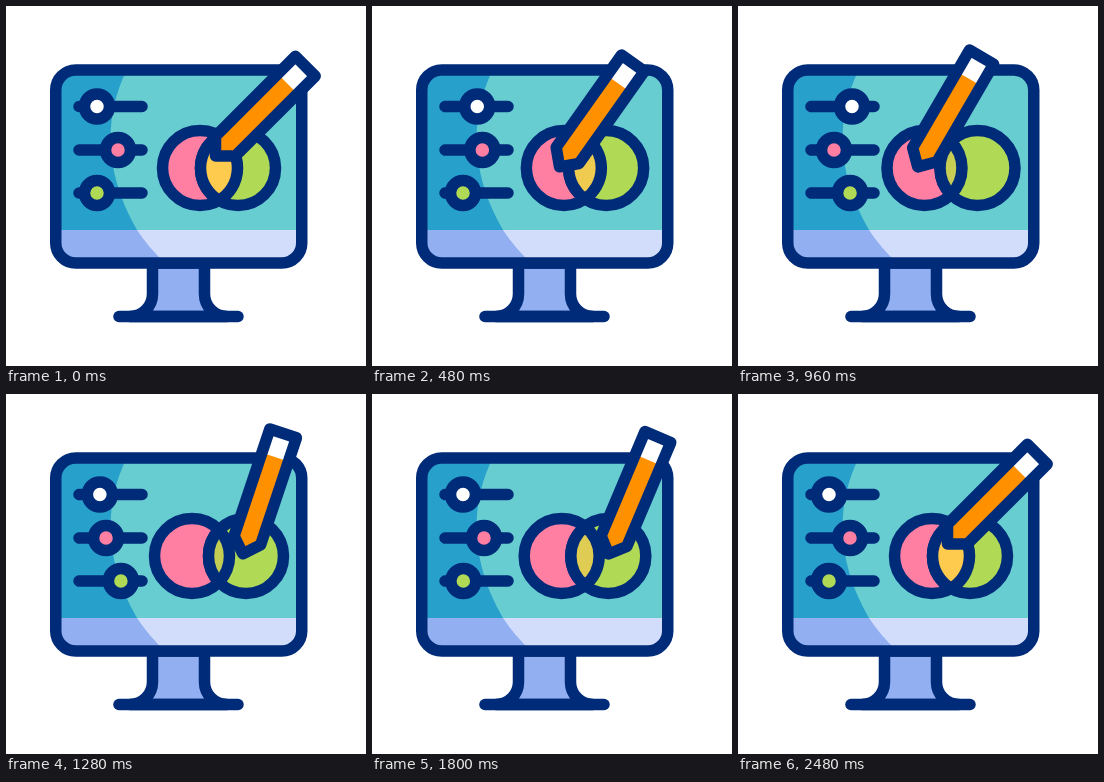
Write an HTML page that moves like this. It is 360 px wide and 360 px high and loops after 3000 ms.

```html
<!DOCTYPE html>
<html lang="en">
<head>
<meta charset="utf-8">
<title>Colour design</title>
<style>
  html, body { margin: 0; height: 100%; overflow: hidden; background: #fff; }
  svg { display: block; width: 100vw; height: 100vh; }
  .line { stroke: #002b78; stroke-width: 11.5; stroke-linecap: round; stroke-linejoin: round; }
</style>
</head>
<body>
<svg viewBox="0 0 360 360" fill="none">
  <clipPath id="screen"><rect x="49.75" y="64" width="246" height="193" rx="20"/></clipPath>
  <path class="line" fill="#92aff1" d="M124 310.5A22.5 22.5 0 0 0 146.5 288V257H198.5V288A22.5 22.5 0 0 0 221 310.5Z"/>
  <path class="line" d="M113 310.5H232"/>
  <g clip-path="url(#screen)">
    <path fill="#67cdd1" d="M44 58H302V224H44Z"/>
    <path fill="#d2dcfb" d="M44 224H302V262H44Z"/>
    <path fill="#27a0cc" d="M44 58H124C98 104 96 164 131 224H44Z"/>
    <path fill="#92aff1" d="M44 224H131Q142 241 160 258H44Z"/>
  </g>
  <rect class="line" x="49.75" y="64" width="246" height="193" rx="20"/>
  <path class="line" d="M73 100.5H136M73 144H136M73 187H136"/>
  <g class="line">
    <circle id="knobWhite" cy="100.5" r="12.5" fill="#fff"/>
    <circle id="knobPink" cy="144" r="12.5" fill="#ff7fa3"/>
    <circle id="knobGreen" cy="187" r="12.5" fill="#b0d955"/>
    <circle id="pink" cy="162" r="37.5" fill="#ff7fa3"/>
    <circle id="green" cy="162" r="37.5" fill="#b0d955"/>
    <path id="lens"/>
  </g>
  <g id="pencil">
    <path fill="#ff9000" d="M0 0L-14 -14V-127H14V-14Z"/>
    <path fill="#fff" d="M-14 -102V-127H14V-102Z"/>
    <path class="line" d="M0 0L-14 -14V-127H14V-14Z"/>
  </g>
</svg>
<script>
const set = (id, name, value) => document.getElementById(id).setAttribute(name, value);

// Eased 0 to 1 between two times.
function ramp(t, start, end) {
  const u = Math.min(1, Math.max(0, (t - start) / (end - start)));
  return u * u * (3 - 2 * u);
}

// Eased 0 to 1, hold, then back to 0.
const pulse = (t, start, end, back, home) => ramp(t, start, end) - ramp(t, back, home);

function drawKnobs(t) {
  set('knobWhite', 'cx', 91 + 23.5 * pulse(t, 160, 720, 920, 1380));
  set('knobPink', 'cx', 112 - 16 * pulse(t, 390, 840, 1080, 1690));
  set('knobGreen', 'cx', 91 + 24 * pulse(t, 530, 1080, 1260, 1840));
}

function drawCircles(t) {
  const mid = 213, cy = 162, r = 37.5;
  const apart = pulse(t, 160, 1100, 1260, 2400);
  const spread = 19 + 8 * apart;
  set('pink', 'cx', mid - spread);
  set('green', 'cx', mid + spread);

  const h = Math.sqrt(r * r - spread * spread);
  const arc = y => `A${r} ${r} 0 0 1 ${mid} ${y}`;
  set('lens', 'd', `M${mid} ${cy - h}${arc(cy + h)}${arc(cy - h)}Z`);
  set('lens', 'fill', `rgb(${255 - 60 * apart}, ${203 + 2 * apart}, ${79 + 5 * apart})`);
}

function drawPencil(t) {
  const toPink = ramp(t, 160, 680), toGreen = ramp(t, 930, 1240), toHome = ramp(t, 1800, 2260);
  const scribble = (toPink - toHome) * Math.sin(2 * Math.PI * (t - 820) / 560);
  const x = 209.5 - 35 * toPink + 65.5 * toGreen - 30.5 * toHome + 3.5 * scribble;
  const y = 150 + 13 * ramp(t, 0, 600) - 5 * toGreen - 8 * toHome - 2 * scribble;
  const angle = 45 - 14.5 * toPink - 12 * toGreen + 26.5 * ramp(t, 1640, 2260);
  set('pencil', 'transform', `translate(${x} ${y}) rotate(${angle})`);
}

function loop() {
  const t = Math.floor(performance.now() % 3000 / 40) * 40;
  drawKnobs(t);
  drawCircles(t);
  drawPencil(t);
  requestAnimationFrame(loop);
}
loop();
</script>
</body>
</html>
```
